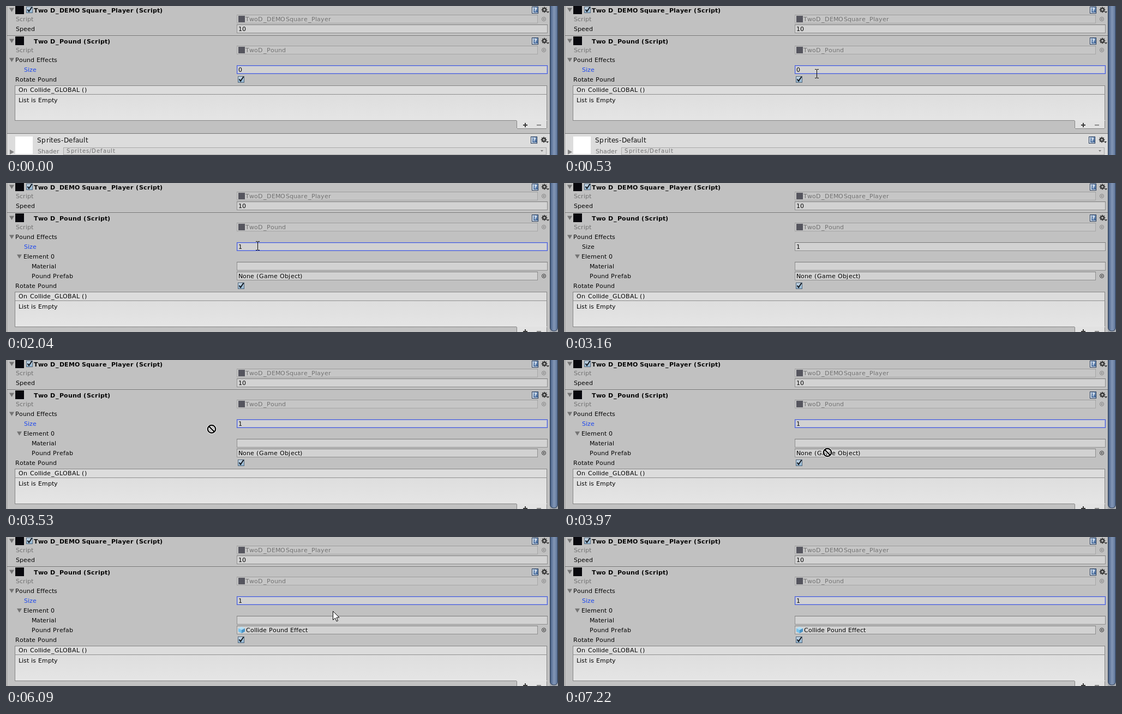
An HTML page with a canvas that plays this animation: 1012 px wide and 274 px high, repeating every 7.69 s.

```html
<!DOCTYPE html>
<html lang="en">
<head>
<meta charset="utf-8">
<title>Inspector</title>
<style>
html, body { margin: 0; width: 100%; height: 100%; overflow: hidden; background: #c1c1c1; }
canvas { display: block; }
</style>
</head>
<body>
<canvas id="stage" width="1012" height="274"></canvas>
<script>
const LOOP = 7690;
const ctx = document.getElementById('stage').getContext('2d');
const PANEL = '#c1c1c1', INK = '#050505', DIM = '#727272', BLUE = '#1c47f0';

// Least advances in em, regular and bold.
const LEAST = { ' ': .35, '_': .636, '(': .454, ')': .454, '-': .454, C: .78, D: .79, S: .7, j: .344 };
const LEAST_BOLD = { ' ': .35, '_': .71, '(': .54, ')': .54 };

// Pointer keys: time, x, y, shape; linear between keys.
const pointer = [
  [0, 821, 250, 'none'],
  [160, 821, 250, 'arrow'], [240, 665, 190, 'arrow'], [340, 540, 155, 'arrow'],
  [440, 475, 148, 'arrow'], [520, 463, 125, 'beam'], [610, 461, 116, 'beam'],
  [799, 461, 116, 'beam'], [800, 461, 115, 'beam'],
  [1020, 461, 115, 'arrow'], [1150, 461, 115, 'beam'],
  [2900, 461, 115, 'beam'], [2940, 440, 126, 'arrow'], [3040, 181, 136, 'arrow'],
  [3100, 80, 174, 'none'],
  [3240, 150, 39, 'ban'], [3300, 204, 77, 'ban'], [3360, 260, 95, 'ban'],
  [3440, 321, 112, 'ban'], [3520, 370, 126, 'ban'], [3600, 418, 132, 'ban'],
  [3660, 432, 146, 'ban'], [3710, 438, 149, 'ban'],
  [3840, 468, 163, 'ban'], [3970, 483, 170, 'ban'], [4000, 483, 170, 'ban'],
  [4040, 483, 172, 'drag'], [4700, 483, 172, 'arrow'],
  [5660, 483, 172, 'arrow'], [5800, 505, 161, 'arrow'], [5950, 555, 144, 'arrow'],
  [6090, 599, 136, 'arrow'], [6200, 644, 131, 'arrow'], [6300, 667, 130, 'arrow'],
  [6710, 667, 130, 'arrow'], [6860, 700, 147, 'arrow'], [7020, 800, 195, 'arrow'],
  [7200, 964, 270, 'arrow'], [7220, 964, 274, 'none']
];

function rect(x, y, w, h, color) {
  ctx.fillStyle = color;
  ctx.fillRect(x, y, w, h);
}

function frame(x, y, w, h, color) {
  ctx.strokeStyle = color;
  ctx.lineWidth = 1;
  ctx.strokeRect(x + .5, y + .5, w - 1, h - 1);
}

function poly(points, fill, stroke) {
  ctx.beginPath();
  points.forEach(([x, y]) => ctx.lineTo(x, y));
  ctx.closePath();
  if (fill) { ctx.fillStyle = fill; ctx.fill(); }
  if (stroke) { ctx.strokeStyle = stroke; ctx.lineWidth = 1; ctx.stroke(); }
}

function disc(x, y, r, color) {
  ctx.beginPath();
  ctx.arc(x, y, r, 0, Math.PI * 2);
  ctx.fillStyle = color;
  ctx.fill();
}

function ring(x, y, r, width, color) {
  ctx.beginPath();
  ctx.arc(x, y, r, 0, Math.PI * 2);
  ctx.lineWidth = width;
  ctx.strokeStyle = color;
  ctx.stroke();
}

function gradient(x0, y0, x1, y1, ...colors) {
  const g = ctx.createLinearGradient(x0, y0, x1, y1);
  colors.forEach((c, i) => g.addColorStop(i / (colors.length - 1), c));
  return g;
}

// Interface text sits on whole-pixel advances.
function text(str, x, base, color = INK, { size = 11, bold = false, track = 0 } = {}) {
  ctx.font = `${bold ? 'bold ' : ''}${size}px "DejaVu Sans", sans-serif`;
  ctx.fillStyle = color;
  const least = bold ? LEAST_BOLD : LEAST;
  for (const ch of str) {
    const natural = ctx.measureText(ch).width;
    const step = Math.round(Math.max(natural, (least[ch] || 0) * size) + (bold ? .1 : 0));
    ctx.fillText(ch, Math.round(x + (step - natural) / 2), base);
    x += step + track;
  }
}

function label(str, x, mid, color) {
  text(str, x, mid + 4, color);
}

function fold(x, mid) {
  poly([[x - 4.5, mid - 3.5], [x + 4.5, mid - 3.5], [x, mid + 4]], '#747474');
}

function field(mid, right, { focus = false, dim = false } = {}) {
  const x = 423, y = mid - 8, w = right - x;
  rect(x, y, w, 16, dim ? '#c6c6c6' : '#d2d2d2');
  if (focus) {
    frame(x, y, w, 16, '#4259dd');
    frame(x + 1, y + 1, w - 2, 14, '#a8b0dc');
  } else {
    frame(x, y, w, 16, dim ? '#a6a6a6' : '#8f8f8f');
    rect(x, y, w, 1, dim ? '#9c9c9c' : '#7b7b7b');
  }
}

function picker(mid, color) {
  ring(986, mid, 3.5, 1, color);
  disc(986, mid, 1.2, color);
}

function checkbox(x, y) {
  rect(x, y, 12, 12, gradient(x, y, x, y + 12, '#c9d8e5', '#8db3d0'));
  frame(x, y, 12, 12, '#52667a');
  ctx.beginPath();
  ctx.moveTo(x + 2.5, y + 5.5);
  ctx.lineTo(x + 5, y + 9);
  ctx.lineTo(x + 10.5, y + 1);
  ctx.lineWidth = 2;
  ctx.strokeStyle = '#10151c';
  ctx.stroke();
}

function book(x, mid) {
  rect(x, mid - 6, 12, 13, '#1f3556');
  rect(x + 1, mid - 5, 2, 10, '#d5dfea');
  rect(x + 3, mid - 5, 8, 10, gradient(0, mid - 5, 0, mid + 5, '#7f9cc0', '#45699a'));
  rect(x + 1, mid + 5, 10, 1, '#e8edf2');
  ctx.font = 'bold 9px "DejaVu Sans", sans-serif';
  ctx.fillStyle = '#ffffff';
  ctx.fillText('?', x + 4, mid + 3);
}

function gear(x, mid) {
  ctx.strokeStyle = '#363636';
  ctx.lineWidth = 2;
  for (let i = 0; i < 4; i++) {
    const a = i * Math.PI / 4, dx = Math.cos(a) * 5.2, dy = Math.sin(a) * 5.2;
    ctx.beginPath();
    ctx.moveTo(x - dx, mid - dy);
    ctx.lineTo(x + dx, mid + dy);
    ctx.stroke();
  }
  disc(x, mid, 3.8, '#363636');
  disc(x, mid, 1.8, PANEL);
  poly([[x + 4, mid + 3], [x + 9, mid + 3], [x + 6.5, mid + 6]], '#303030');
}

function component(mid, title, script, enabled) {
  fold(10.5, mid);
  rect(17, mid - 8, 16, 16, '#08080d');
  if (enabled) checkbox(37, mid - 6);
  text(title, 51, mid + 5, INK, { bold: true });
  book(964, mid);
  gear(987, mid);
  const row = mid + 17;
  label('Script', 17, row, DIM);
  field(row, 975, { dim: true });
  rect(426, row - 6, 12, 12, '#55555e');
  label(script, 439, row, DIM);
  picker(row, '#818181');
}

function cube(x, mid) {
  const top = mid - 6, low = mid + 6;
  poly([[x, top + 3], [x + 6, top], [x + 12, top + 3], [x + 6, top + 6]], '#b4def3');
  poly([[x, top + 3], [x + 6, top + 6], [x + 6, low], [x, low - 3]], '#79c2ea');
  poly([[x + 12, top + 3], [x + 6, top + 6], [x + 6, low], [x + 12, low - 3]], '#4a93c6');
}

function eventList(y) {
  rect(16, y, 976, 17, '#dcdcdc');
  rect(16, y + 17, 976, 48, gradient(0, y + 17, 0, y + 65, '#dedede', '#e5e5e5'));
  frame(16, y, 976, 65, '#858585');
  rect(16, y + 16, 976, 1, '#8e8e8e');
  rect(936, y + 64, 56, 16, '#e2e2e2');
  rect(936, y + 65, 1, 14, '#858585');
  rect(991, y + 65, 1, 14, '#858585');
  rect(937, y + 79, 54, 1, '#858585');
  label('On Collide_GLOBAL ()', 23, y + 8);
  label('List is Empty', 23, y + 27);
  rect(948, y + 72, 8, 2, '#3b3b3b');
  rect(951, y + 69, 2, 8, '#3b3b3b');
  rect(973, y + 72, 8, 2, '#898989');
}

function material(y) {
  rect(2, y, 995, 1, '#777777');
  rect(2, y + 1, 995, 60, '#dcdcdc');
  rect(17, y + 6, 32, 32, '#ffffff');
  poly([[7, y + 30], [15, y + 34.5], [7, y + 39]], '#818181');
  text('Sprites-Default', 57, y + 17, '#111', { size: 12, track: .27 });
  book(962, y + 12);
  gear(986, y + 12);
  label('Shader', 57, y + 33, DIM);
  rect(105, y + 26, 886, 14, '#d8d8d8');
  frame(105, y + 26, 886, 14, '#a8a8a8');
  text('Sprites/Default', 111, y + 36, DIM, { size: 10, track: 1 });
  poly([[980, y + 31], [985, y + 31], [982.5, y + 34]], '#777777');
}

function scrollbar(open) {
  rect(997, 0, 15, 274, '#a4a8ae');
  ctx.beginPath();
  ctx.roundRect(997.5, -20, 14, open ? 292 : 320, 6);
  ctx.fillStyle = gradient(998, 0, 1011, 0, '#465d80', '#667da1', '#8195b4', '#7389ab', '#566c8f');
  ctx.fill();
  ctx.lineWidth = 1;
  ctx.strokeStyle = '#2b3a52';
  ctx.stroke();
}

function arrow(x, y) {
  const shape = [[0, 0], [0, 16], [4, 12.5], [6.5, 18.5], [9, 17.5], [6.5, 11.5], [11.5, 11.5]];
  poly(shape.map(([a, b]) => [x + a + .5, y + b + .5]), '#ffffff', '#000000');
}

function beam(x, y) {
  rect(x, y - 7, 1, 15, INK);
  for (const edge of [y - 8, y + 8]) {
    rect(x - 3, edge, 3, 1, INK);
    rect(x + 1, edge, 3, 1, INK);
  }
}

function ban(x, y) {
  const slash = (w, c) => {
    ctx.beginPath();
    ctx.moveTo(x - 5, y - 5);
    ctx.lineTo(x + 5, y + 5);
    ctx.lineWidth = w;
    ctx.strokeStyle = c;
    ctx.stroke();
  };
  ring(x, y, 7.2, 3.8, '#ffffff');
  slash(4.2, '#ffffff');
  ring(x, y, 7.2, 2.2, '#000000');
  slash(2.4, '#000000');
}

function drag(x, y) {
  arrow(x, y);
  rect(x + 9, y + 19, 12, 12, '#ffffff');
  frame(x + 9, y + 19, 12, 12, '#000000');
  ctx.beginPath();
  ctx.moveTo(x + 12, y + 28);
  ctx.quadraticCurveTo(x + 12, y + 24, x + 16, y + 24);
  ctx.lineWidth = 2;
  ctx.strokeStyle = '#000000';
  ctx.stroke();
  poly([[x + 15, y + 21], [x + 19, y + 24], [x + 15, y + 27]], '#000000');
}

const shapes = { arrow, beam, ban, drag };

function drawPointer(t) {
  const i = pointer.findLastIndex(key => key[0] <= t);
  const [t0, x0, y0, shape] = pointer[i];
  if (shape === 'none') return;
  const [t1, x1, y1] = pointer[i + 1];
  const k = (t - t0) / (t1 - t0);
  shapes[shape](Math.round(x0 + (x1 - x0) * k), Math.round(y0 + (y1 - y0) * k));
}

function draw(t) {
  const open = t >= 2040;
  const focus = t < 3080 || t >= 3240;
  const shift = open ? 54 : 0;

  rect(0, 0, 1012, 274, PANEL);
  rect(0, 0, 1, 274, '#d2d2d2');
  rect(1, 0, 1, 274, '#898989');

  component(7, 'Two D_DEMO Square_Player (Script)', 'TwoD_DEMOSquare_Player', true);
  label('Speed', 17, 42);
  field(42, 993);
  label('10', 426, 42);

  rect(2, 54, 995, 1, '#737373');
  rect(2, 55, 995, 1, '#cecece');
  component(64, 'Two D_Pound (Script)', 'TwoD_Pound', false);

  fold(10.5, 99);
  label('Pound Effects', 17, 99);
  label('Size', 32, 117, focus ? BLUE : INK);
  field(117, 993, { focus });
  const size = t < 1020 ? '0' : t < 1430 ? '' : '1';
  label(size, 426, 117);
  if (t >= 1020 && !open) rect(size ? 433 : 426, 111, 1, 12, INK);

  if (open) {
    fold(24.5, 135);
    label('Element 0', 32, 135);
    label('Material', 47, 153);
    field(153, 993);
    label('Pound Prefab', 47, 171);
    field(171, 975, { focus: t >= 4040 && t < 4930 });
    picker(171, '#303030');
    if (t < 4930) {
      label('None (Game Object)', 426, 171);
    } else {
      cube(426, 171);
      label('Collide Pound Effect', 439, 171);
    }
  }

  label('Rotate Pound', 17, 135 + shift);
  checkbox(425, 129 + shift);
  eventList(146 + shift);
  material(234 + shift);
  scrollbar(open);
  drawPointer(t);
}

function tick() {
  draw(performance.now() % LOOP);
  requestAnimationFrame(tick);
}
tick();
</script>
</body>
</html>
```
